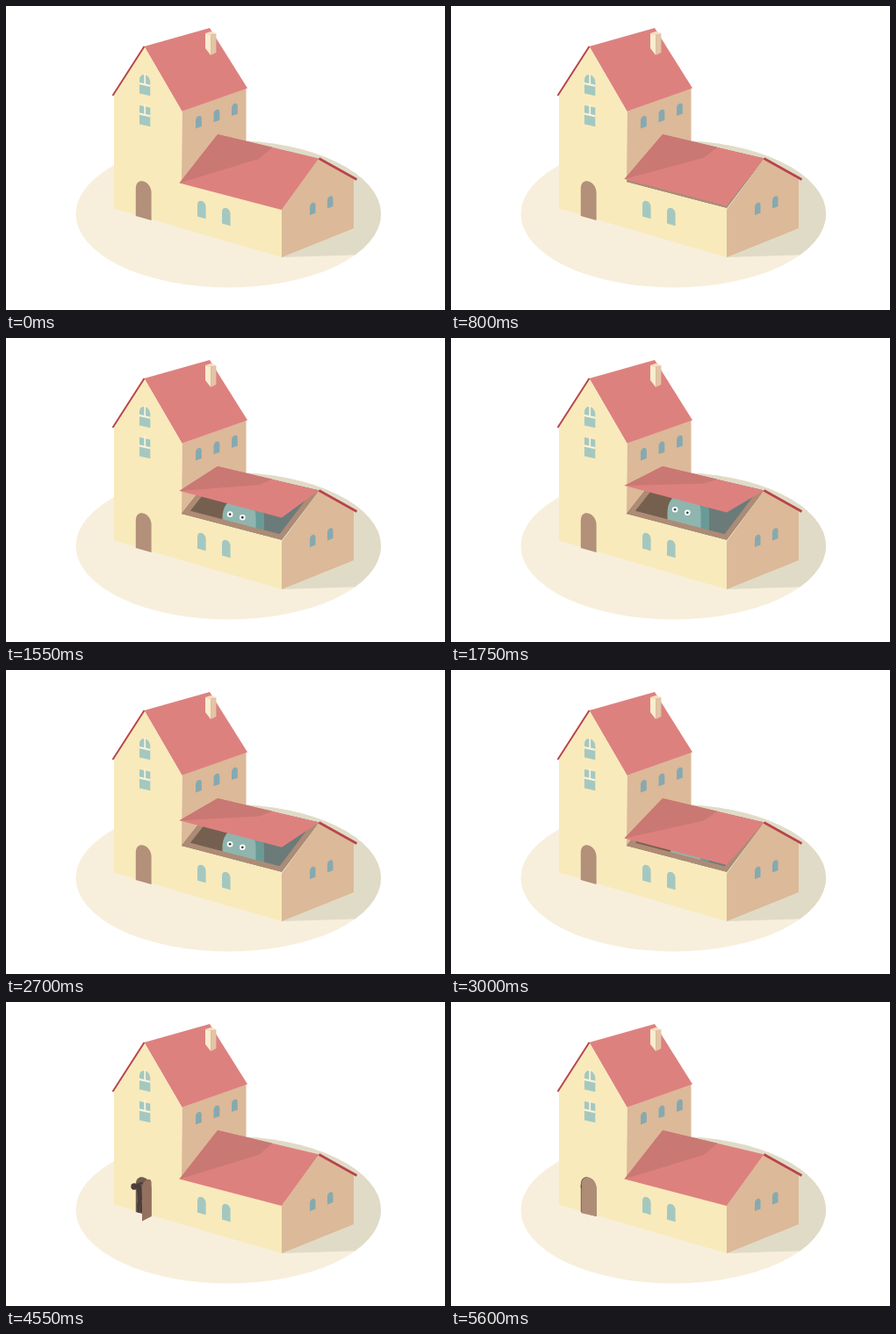
Recreate the animation shown at these times as an HTML page with a canvas. Size 500x346 px, loop 5650 ms.

```html
<!DOCTYPE html>
<html lang="en">
<head>
<meta charset="utf-8">
<title>House</title>
<style>
html, body { margin: 0; overflow: hidden; background: #fff; }
canvas { display: block; }
</style>
</head>
<body>
<canvas id="stage" width="500" height="346"></canvas>
<script>
const ctx = document.getElementById('stage').getContext('2d');
const LOOP = 5650, STEP = 50;
const CREAM = '#f8eabb', TAN = '#dcb998', ROOF = '#dd817f', ROOF_SHADE = '#ca7873', VERGE = '#b8444c';
const GLASS = '#a4c8c0', SIDE_GLASS = '#86a9b0', FRAME = '#fbf3d8', DARK = '#4a3d3b';

// Key corners of the building
const towerPeak = [157.5, 46], towerRidge = [232, 25], towerEave = [200.5, 120], towerBack = [274, 93.5];
const wingPeak = [356.5, 173.5], wingRidge = [241, 146], wingEave = [314, 232], wingFoot = [314, 286];
const wallStart = [200, 200], wallEnd = [314, 229.7];

const clamp = v => Math.max(0, Math.min(1, v));
const mix = (a, b, k) => a + (b - a) * k;
const between = (p, q, k) => [mix(p[0], q[0], k), mix(p[1], q[1], k)];
const shift = ([x, y], dx, dy) => [x + dx, y + dy];

function trace(points) {
  ctx.beginPath();
  points.forEach(p => ctx.lineTo(...p));
}

function poly(color, ...points) {
  trace(points);
  ctx.fillStyle = color;
  ctx.fill();
}

function line(color, width, ...points) {
  trace(points);
  ctx.strokeStyle = color;
  ctx.lineWidth = width;
  ctx.stroke();
}

function oval(color, x, y, rx, ry = rx) {
  ctx.beginPath();
  ctx.ellipse(x, y, rx, ry, 0, 0, 7);
  ctx.fillStyle = color;
  ctx.fill();
}

// Skewed arch standing on (x, y); the base rises by skew over its width
function arch(color, x, y, w, side, skew) {
  const top = y - side, bulge = 0.8 * w;
  ctx.beginPath();
  ctx.moveTo(x, y);
  ctx.lineTo(x, top);
  ctx.bezierCurveTo(x, top - bulge, x + w, top + skew - bulge, x + w, top + skew);
  ctx.lineTo(x + w, y + skew);
  ctx.fillStyle = color;
  ctx.fill();
}

function archRow(color, count, x, y, dx, dy, w, side) {
  for (let i = 0; i < count; i++) arch(color, x + i * dx, y + i * dy, w, side, w * dy / dx);
}

function clipped(points, draw) {
  ctx.save();
  trace(points);
  ctx.clip();
  draw();
  ctx.restore();
}

function drawGround() {
  const disc = color => oval(color, 253.3, 236.7, 173.8, 83.7);
  disc('#f7efdc');
  clipped([[265, 140], [440, 140], [440, 282], wingFoot], () => disc('#e0dbc7'));
}

function drawChimney(x, y, w, h) {
  poly('#f3e2c2', [x, y], [x + w, y - 2], [x + 2 * w, y], [x + w, y + 2]);
  poly('#f8edcf', [x, y], [x + w, y + 2], [x + w, y + h], [x, y + h - 8]);
  poly('#e2c5a5', [x + w, y + 2], [x + 2 * w, y], [x + 2 * w, y + h - 3], [x + w, y + h]);
}

function drawTower() {
  poly(TAN, towerEave, shift(towerBack, -0.5, 0), [273.5, 160], wingRidge, [200, 202]);
  poly(ROOF, towerPeak, towerRidge, shift(towerBack, 1, 0), towerEave);
  poly(CREAM, [123, 100], towerPeak, towerEave, wallStart, wallEnd, wingFoot, [123, 230.5]);
  line(VERGE, 2, towerPeak, [121.5, 102]);
  drawChimney(227, 31, 6.2, 25);
  archRow(SIDE_GLASS, 3, 216, 139.5, 20.5, -7.2, 6.8, 9);
}

function drawFrontWindows() {
  const x = 152, w = 12.3, skew = 2.7;
  const slat = (color, y, h) => poly(color, [x, y], [x + w, y + skew], [x + w, y + skew + h], [x, y + h]);
  arch(GLASS, x, 99.5, w, 15, skew);
  slat(GLASS, 113, 21.5);
  for (const y of [87, 121.5]) {
    slat(FRAME, y, 2.2);
    line(FRAME, 1.8, [158.2, y - 10], [158.2, y + 2]);
  }
  archRow(GLASS, 2, 218, 239.5, 28, 8, 9.6, 13.2);
}

function drawMonster(sink) {
  ctx.save();
  ctx.translate(0, sink);
  arch('#699a96', 256, 245, 38, 46, 0);
  arch('#8fb5ae', 246.5, 245, 38, 46, 0);
  for (const side of [-1, 1]) {
    const x = 262.2 + 7.1 * side, y = 197 + 1.8 * side;
    oval('#fff', x, y, 3.3);
    oval('#3b4547', x, y, 1.4);
  }
  ctx.restore();
}

function drawInside(open) {
  const rim = [wallStart, [242, 147], wingPeak, wallEnd, wallStart];
  clipped(rim, () => {
    ctx.fillStyle = '#75604f';
    ctx.fillRect(190, 140, 80, 100);
    ctx.fillStyle = '#6b7b7a';
    ctx.fillRect(270, 140, 90, 100);
    drawMonster(30 * (1 - open));
    line('#ad8b75', 11.5, ...rim);
  });
}

function drawWingRoof(open) {
  const lift = -33.5 * open;
  const left = shift([197.5, 201.5], 0, lift), right = shift(wingEave, 0, lift);
  const shadowTop = between(wingRidge, wingPeak, 0.54);
  const middle = between(wingRidge, wingPeak, 0.5), eaveMiddle = between(left, right, 0.5);
  poly(ROOF, wingRidge, wingPeak, right, left);
  poly(ROOF_SHADE, wingRidge, shadowTop, between(middle, eaveMiddle, 0.25), left);
}

function drawGable() {
  poly(TAN, wingEave, wingPeak, [396, 197], [396, 253], wingFoot);
  line(VERGE, 2.6, wingPeak, [399.5, 197.5]);
  archRow(SIDE_GLASS, 2, 346, 238, 20, -7.5, 6.5, 9);
}

function drawVisitor(open) {
  ctx.save();
  ctx.translate(6 * (1 - open), 0);
  ctx.lineCap = ctx.lineJoin = 'round';
  oval(DARK, 146, 210, 3.7);
  line(DARK, 5, [151.5, 210], [152.5, 224]);
  line(DARK, 2.2, [148, 210], [151, 207], [155, 206]);
  for (const x of [151, 154]) line(DARK, 2.6, [152.5, 224], [x - 0.5, 231], [x, 238.5]);
  ctx.restore();
}

function drawDoor(open) {
  const hinge = 165.6, floor = 244, closed = 147.8;
  const x = closed + 7.2 * open, y = 239 + 10.5 * open;
  if (open) {
    arch('#715c4f', closed, 239, hinge - closed, 31.3, 5);
    drawVisitor(open);
  }
  const color = `rgb(${178 - 30 * open}, ${144 - 32 * open}, ${121 - 26 * open})`;
  arch(color, x, y, hinge - x, mix(31.3, 38, open), floor - y);
}

function draw(now) {
  const t = Math.floor(now % LOOP / STEP) * STEP;
  const roof = t < 2700 ? clamp((t - 650) / 1100) : clamp((3150 - t) / 500);
  const door = t < 5250 ? clamp((t - 3800) / 750) : clamp((5650 - t) / 450);
  ctx.clearRect(0, 0, 500, 346);
  drawGround();
  drawTower();
  if (roof) drawInside(roof);
  drawFrontWindows();
  drawWingRoof(roof);
  drawGable();
  drawDoor(door);
}

const start = performance.now();
function tick() {
  draw(performance.now() - start);
  requestAnimationFrame(tick);
}
tick();
</script>
</body>
</html>
```
